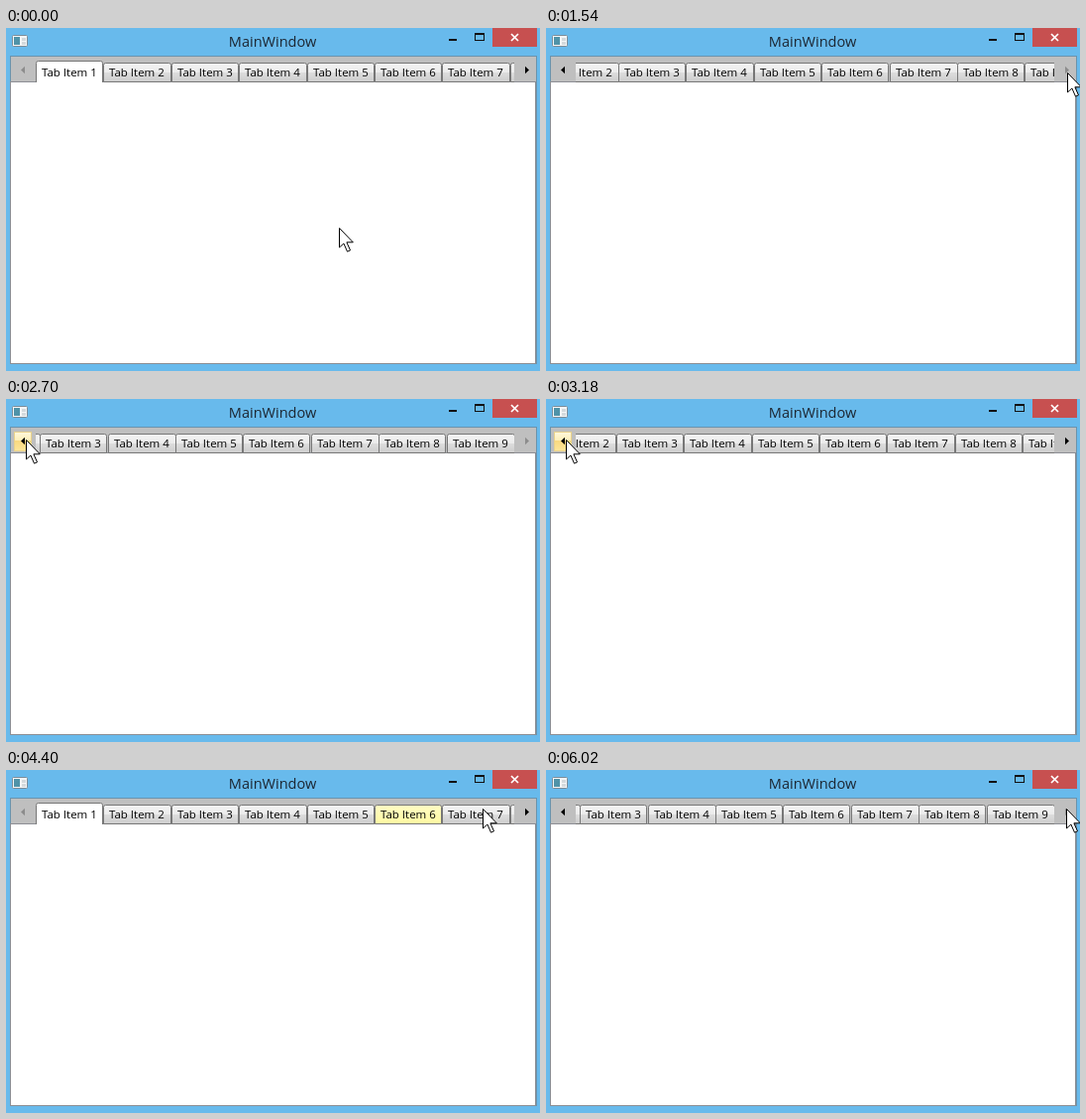
Write an HTML page that moves like this. It is 539 by 347 pixels and loops after 6.55 s.

```html
<!DOCTYPE html>
<html lang="en">
<head>
<meta charset="utf-8">
<title>MainWindow</title>
<style>
  html, body { margin: 0; width: 100%; height: 100%; overflow: hidden; background: #68baec; }
  svg { display: block; }
  text { font-family: "Open Sans", "Noto Sans", sans-serif; fill: #000; }
  .title { font-size: 14.5px; fill: #1c2733; }
  .label { font-size: 11.5px; }
  .tab path { fill: url(#plain); stroke: #777; }
  .tab.hot path { fill: url(#glow); }
  .tab.selected path { fill: #fff; }
  .face { fill: none; }
  .hot .face { fill: url(#hover); stroke: #e9d28c; }
  .arrow { fill: #8c8c8c; }
  .enabled .arrow { fill: #000; }
</style>
</head>
<body>
<svg width="539" height="347" viewBox="0 0 539 347">
  <defs>
    <linearGradient id="plain" x2="0" y2="1">
      <stop offset="0" stop-color="#f3f3f3"/><stop offset=".5" stop-color="#ebebeb"/>
      <stop offset=".5" stop-color="#ddd"/><stop offset="1" stop-color="#cdcdcd"/>
    </linearGradient>
    <linearGradient id="glow" x2="0" y2="1">
      <stop offset="0" stop-color="#fffcc4"/><stop offset="1" stop-color="#fff9a2"/>
    </linearGradient>
    <linearGradient id="hover" x2="0" y2="1">
      <stop offset="0" stop-color="#fff8dc"/><stop offset=".45" stop-color="#fdeeb8"/>
      <stop offset=".45" stop-color="#f8d880"/><stop offset="1" stop-color="#fde698"/>
    </linearGradient>
  </defs>

  <rect width="539" height="347" fill="#68baec"/>
  <rect x="6.5" y="7.5" width="15" height="11" rx="1" fill="#f4f6f7" stroke="#7e8d98"/>
  <rect x="8" y="9" width="6" height="8" fill="#4f93a8"/>
  <path d="M16 10h4v3h-4zM16 14h4v3h-4z" fill="#d3d9dc"/>
  <text class="title" x="269" y="19" text-anchor="middle">MainWindow</text>
  <rect x="447" y="11" width="8" height="2" fill="#111"/>
  <path d="M473 5h10v8h-10zM474 7v5h8v-5z" fill="#111" fill-rule="evenodd"/>
  <rect x="491" width="45" height="19" fill="#c75050"/>
  <path d="M510 6l7 7M517 6l-7 7" stroke="#fff" stroke-width="1.7"/>

  <rect x="4.5" y="28.5" width="531" height="311" fill="#bfbfbf" stroke="#6b93ac"/>
  <rect x="4.5" y="54.5" width="530" height="285" fill="#fff" stroke="#8c8e94"/>
  <svg id="strip" x="30" y="30" width="483" height="25"></svg>

  <g id="left">
    <rect class="face" x="8.5" y="33.5" width="17" height="19"/>
    <path class="arrow" d="M15 42.5l4-3.8v7.6z"/>
  </g>
  <g id="right">
    <rect class="face" x="517.5" y="33.5" width="17" height="19"/>
    <path class="arrow" d="M528 42.5l-4-3.8v7.6z"/>
  </g>
  <path id="cursor" d="M.5 .5V20l4.4-4 3.6 8.2 3-1.3-3.6-8.1h6.4z" fill="#fff" stroke="#000"/>
</svg>

<script>
const LOOP = 6550, REFRESH = 77.5, FIRST = 130;
const TAB = 68.4, VIEW = 483, COUNT = 9, MAX = TAB * COUNT - VIEW;
const HOVER_LAG = 45;   // highlight trails the pointer
const STOP_EARLY = 500; // a button greys out before its slide has finished
const $ = id => document.getElementById(id);

const slides = [
  { from: 740, to: 1850, dir: 1 },
  { from: 2821, to: 4020, dir: -1 },
  { from: 4885, to: 6020, dir: 1 }
];
const moves = [
  { from: 60, to: 650, x: 526, y: 48 },
  { from: 1250, to: 1400, x: 526, y: 45 },
  { from: 2075, to: 2095, x: 424, y: 41 },
  { from: 2145, to: 2600, x: 20, y: 41 },
  { from: 4215, to: 4467, x: 525, y: 39 }
];

const progress = (t, { from, to }) => Math.min(1, Math.max(0, (t - from) / (to - from)));
const easeOut = u => 1 - (1 - u) ** 2;

const scrollAt = t => slides.reduce((sum, s) => sum + s.dir * MAX * progress(t, s), 0);

function cursorAt(t) {
  let x = 336, y = 202;
  for (const m of moves) {
    const u = easeOut(progress(t, m));
    x += (m.x - x) * u;
    y += (m.y - y) * u;
  }
  return { x, y };
}

// The end a finished slide rests at: 1 right, -1 left, 0 between
function endAt(t) {
  const slide = slides.filter(s => t >= s.from).pop();
  if (!slide) return -1;
  return t >= slide.to - STOP_EARLY ? slide.dir : 0;
}

function makeTab(i) {
  const tab = document.createElementNS("http://www.w3.org/2000/svg", "g");
  const top = i ? 5.5 : 3.5, bottom = i ? "24.5" : "26", close = i ? "z" : "";
  const width = Math.round((i + 1) * TAB) - Math.round(i * TAB) - 1;
  tab.setAttribute("class", i ? "tab" : "tab selected");
  tab.innerHTML =
    `<path d="M.5 ${bottom}V${top + 2}q0-2 2-2H${width - 1.5}q2 0 2 2V${bottom}${close}"/>` +
    `<text class="label" x="6" y="19">Tab Item ${i + 1}</text>`;
  $("strip").append(tab);
  return tab;
}
const tabs = Array.from({ length: COUNT }, (_, i) => makeTab(i));

function setButton(id, enabled, over) {
  $(id).classList.toggle("enabled", enabled);
  $(id).classList.toggle("hot", enabled && over);
}

function draw(now) {
  // The screen shows the latest refresh
  const t = Math.max(0, FIRST + Math.floor((now % LOOP - FIRST) / REFRESH) * REFRESH);
  const scroll = scrollAt(t), end = endAt(t);
  const { x, y } = t < FIRST ? cursorAt(0) : cursorAt(t);
  const was = cursorAt(t - HOVER_LAG);
  const inStrip = was.x > 30 && was.x < 513 && was.y > 34 && was.y < 55;
  const hot = inStrip ? Math.floor((was.x - 30 + scroll) / TAB) : -1;

  tabs.forEach((tab, i) => {
    tab.setAttribute("transform", `translate(${Math.round(i * TAB - scroll)})`);
    tab.classList.toggle("hot", i === hot);
  });
  setButton("left", end !== -1, x < 27 && y < 54);
  setButton("right", end !== 1, x > 516 && y < 54);
  $("cursor").setAttribute("transform", `translate(${Math.round(x)} ${Math.round(y)})`);
}

const start = performance.now();
function tick() {
  draw(performance.now() - start);
  requestAnimationFrame(tick);
}
tick();
</script>
</body>
</html>
```
